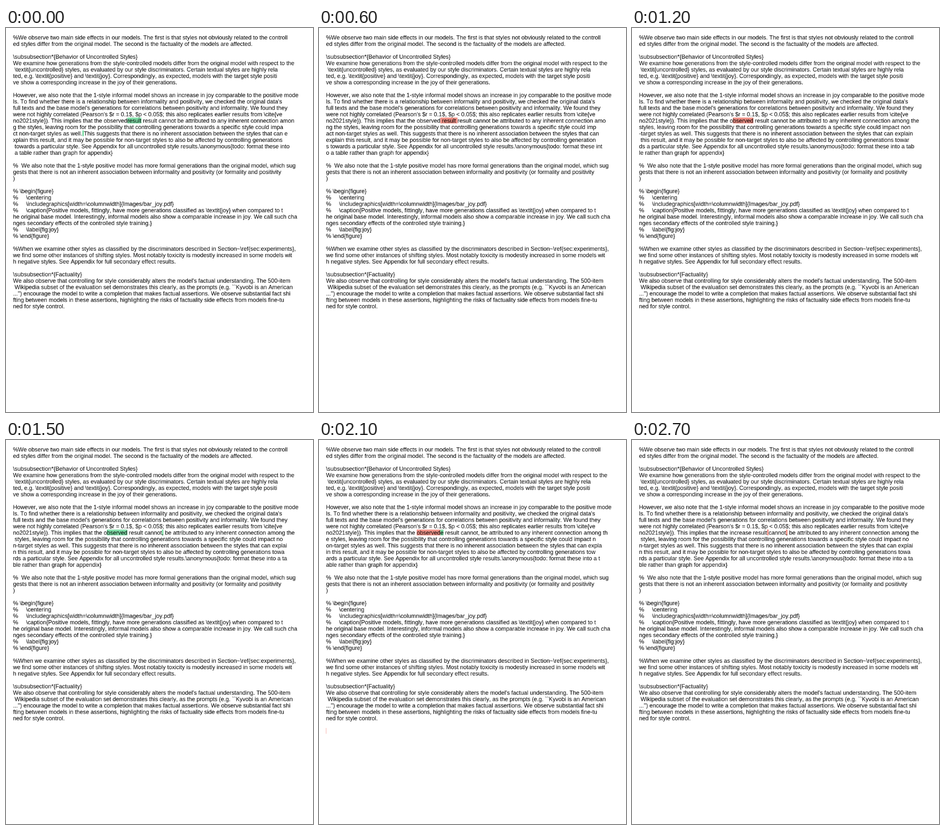
Write an HTML page with a canvas that moves like this. It is 670 px wide and 836 px high and loops after 3 s.

```html
<!DOCTYPE html>
<html lang="en">
<head>
<meta charset="utf-8">
<title>Text edits</title>
<style>
html, body { margin: 0; width: 100%; height: 100%; overflow: hidden; background: #fff; }
canvas { display: block; }
</style>
</head>
<body>
<canvas id="page" width="670" height="836"></canvas>
<script type="text/plain" id="draft">
%We observe two main side effects in our models. The first is that styles not obviously related to the controlled styles differ from the original model. The second is the factuality of the models are affected.

\subsubsection*{Behavior of Uncontrolled Styles}
We examine how generations from the style-controlled models differ from the original model with respect to the \textit{uncontrolled} styles, as evaluated by our style discriminators. Certain textual styles are highly related, e.g. \textit{positive} and \textit{joy}. Correspondingly, as expected, models with the target style positive show a corresponding increase in the joy of their generations.

However, we also note that the 1-style informal model shows an increase in joy comparable to the positive models. To find whether there is a relationship between informality and positivity, we checked the original data's full texts and the base model's generations for correlations between positivity and informality. We found they were not highly correlated (Pearson's $r = 0.1$, $p < 0.05$; this also replicates earlier results from \cite{veno2021style}). This implies that the @ be attributed to any inherent connection among the styles, leaving room for the possibility that controlling generations towards a specific style could impact non-target styles as well.#This suggests that there is no inherent association between the styles that can explain this result, and it may be possible for non-target styles to also be affected by controlling generations towards a particular style. See Appendix for all uncontrolled style results.\anonymous{todo: format these into a table rather than graph for appendix}

%  We also note that the 1-style positive model has more formal generations than the original model, which suggests that there is not an inherent association between informality and positivity (or formality and positivity)

% \begin{figure}
%     \centering
%     \includegraphics[width=\columnwidth]{Images/bar_joy.pdf}
%     \caption{Positive models, fittingly, have more generations classified as \textit{joy} when compared to the original base model. Interestingly, informal models also show a comparable increase in joy. We call such changes secondary effects of the controlled style training.}
%     \label{fig:joy}
% \end{figure}

%When we examine other styles as classified by the discriminators described in Section~\ref{sec:experiments}, we find some other instances of shifting styles. Most notably toxicity is modestly increased in some models with negative styles. See Appendix for full secondary effect results.

\subsubsection*{Factuality}
We also observe that controlling for style considerably alters the model's factual understanding. The 500-item Wikipedia subset of the evaluation set demonstrates this clearly, as the prompts (e.g. ``Kyvobi is an American...'') encourage the model to write a completion that makes factual assertions. We observe substantial fact shifting between models in these assertions, highlighting the risks of factuality side effects from models fine-tuned for style control.
</script>
<script>
const STEP = 300, WIDTH = 670, HEIGHT = 836;
const GREEN = '#82e0aa', RED = '#f1948a';
// The sheet is set in 18px type on 60 lines of 20px, then shrunk to the page.
const SIZE = 18, LEADING = 20, LEFT = 22, ASCENT = 16;
const draft = document.getElementById('draft').textContent.trim();
const page = document.getElementById('page').getContext('2d');
page.imageSmoothingQuality = 'high';

// Each edit: phrase, gap before "This", text after the end.
// « » marks an insertion, ‹ › a deletion.
const sheets = [
  ['observed«result» result cannot', '« »'],
  ['observed« »result result cannot'],
  ['observed‹ result ›result cannot'],
  ['observed« »result cannot'],
  ['o‹bserved› result cannot'],
  ['o«bserved» result cannot«,»'],
  ['observed result cannot,', ' ', '\n\n«»'],
  ['‹observed›«e» result cannot,', ' ', '\n\n‹›'],
  ['«increas»e result cannot,'],
  ['increase result‹ ›cannot‹,›']
].map(([phrase, gap = ' ', tail = '']) =>
  typeset(layout(draft.replace('@', phrase).replace('#', gap) + tail)));

// Separates the marks from the text and wraps it at 111 characters, line breaks included.
function layout(source) {
  const marks = [];
  let plain = '';
  for (const ch of source) {
    if ('«‹'.includes(ch)) marks.push({ start: plain.length, color: ch === '«' ? GREEN : RED });
    else if ('»›'.includes(ch)) marks[marks.length - 1].end = plain.length;
    else plain += ch;
  }
  let end = 0;
  return plain.match(/\n.{0,110}|.{1,111}/g).map(piece => {
    const text = piece.replace('\n', '');
    end += piece.length;
    const start = end - text.length, stop = end;
    return { text, start, marks: marks.filter(m => m.start >= start && m.end <= stop) };
  });
}

function typeset(lines) {
  const sheet = document.createElement('canvas');
  sheet.width = 962;
  sheet.height = 60 * LEADING;
  const ctx = sheet.getContext('2d');
  ctx.fillStyle = '#fff';
  ctx.fillRect(0, 0, sheet.width, sheet.height);
  ctx.font = `${SIZE}px "Liberation Sans", Arial, sans-serif`;
  ctx.fontKerning = 'none';
  lines.forEach(({ text, start, marks }, row) => {
    const y = (row + 1) * LEADING;
    const edge = i => LEFT + ctx.measureText(text.slice(0, i - start)).width;
    for (const m of marks) {
      const x = edge(m.start);
      ctx.fillStyle = m.color;
      ctx.fillRect(x, y, Math.max(edge(m.end) - x, 1), SIZE);
    }
    ctx.fillStyle = '#000';
    ctx.fillText(text, LEFT, y + ASCENT);
  });
  return sheet;
}

function tick() {
  const step = Math.floor(performance.now() / STEP) % sheets.length;
  page.drawImage(sheets[step], 0, 0, WIDTH, HEIGHT);
  requestAnimationFrame(tick);
}
tick();
</script>
</body>
</html>
```
